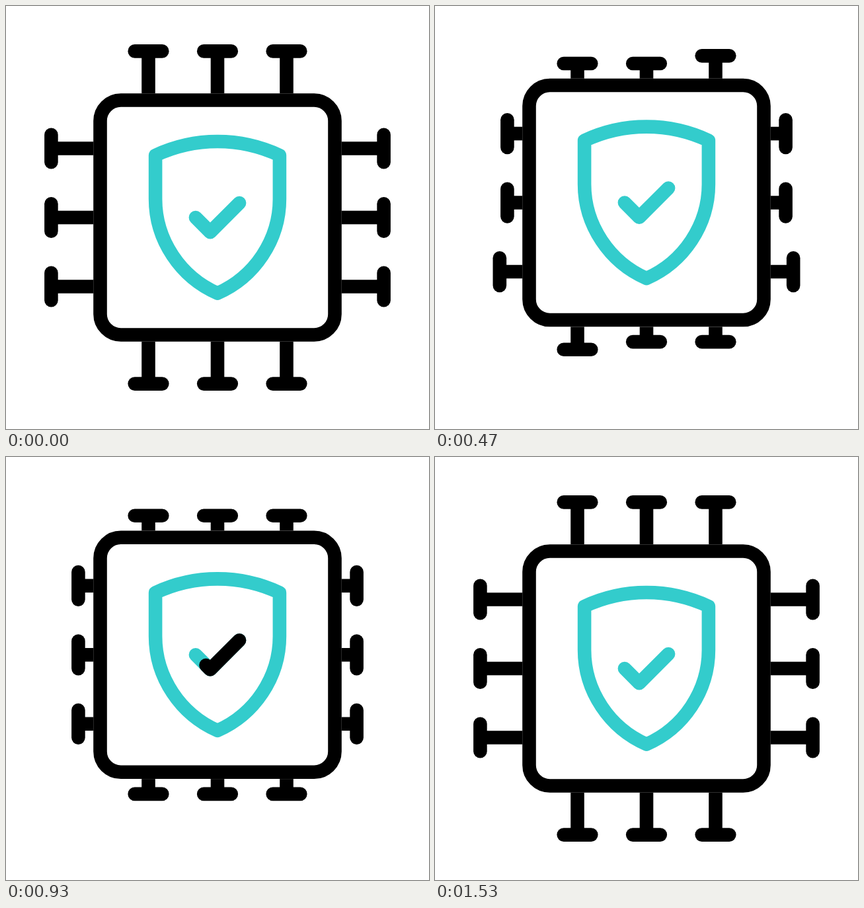
An HTML page with a canvas for the animation above (1.67 s loop, 640 px wide and 640 px high).

```html
<!DOCTYPE html>
<html lang="en">
<head>
<meta charset="utf-8">
<title>Secure chip</title>
<style>
  html, body { margin: 0; width: 100%; height: 100%; overflow: hidden; background: #fff; }
  canvas { display: block; width: 640px; height: 640px; }
</style>
</head>
<body>
<canvas id="stage" width="640" height="640"></canvas>
<script>
const ctx = document.getElementById('stage').getContext('2d');
const LOOP = 1670, FRAME = 100 / 3;
const STROKE = 20.6, TEAL = '#33cccc', BLACK = '#000';
const EDGE = 187.8;      // chip centre to its outer edge
const PIN_REACH = 251.6; // chip centre to a pin head
const PIN_TRAVEL = 41;
const PIN_GAP = 104.5;

// Vertical bounce: [frame, offset]
const BOUNCE = [[0, 0], [11.6, -37.3], [19.9, 36], [28, -20.7], [36, 7], [42.8, 0]];

const shield = new Path2D(
  'M226.1 226 A221 221 0 0 1 413.9 226 V292 C413.9 354 376 410 320 434.6 C264 410 226.1 354 226.1 292 Z');
const check = new Path2D('M286.9 320 L309 342.1 L353.1 298');
const CHECK_LENGTH = 66.2 * Math.SQRT2;

const progress = (f, from, to) => Math.min(1, Math.max(0, (f - from) / (to - from)));
const smooth = t => t * t * (3 - 2 * t);

// cubic-bezier(.25, 0, .75, 1)
function softEase(t) {
  let lo = 0, hi = 1;
  for (let i = 0; i < 20; i++) {
    const u = (lo + hi) / 2, v = 1 - u;
    if (0.75 * u * v * v + 2.25 * u * u * v + u * u * u < t) lo = u; else hi = u;
  }
  return smooth(lo);
}

function bounce(f) {
  for (let i = 1; i < BOUNCE.length; i++) {
    const [start, a] = BOUNCE[i - 1], [end, b] = BOUNCE[i];
    if (f < end) {
      const t = progress(f, start, end);
      return a + (b - a) * smooth(i === 1 ? t ** 0.9 : t);
    }
  }
  return 0;
}

function retraction(f, i) {
  const pull = 4 + 3 * i, push = 36 + 2 * i;
  return softEase(progress(f, pull, pull + 6)) - softEase(progress(f, push, push + 6));
}

function line(x1, y1, x2, y2, cap) {
  ctx.lineCap = cap;
  ctx.beginPath();
  ctx.moveTo(x1, y1);
  ctx.lineTo(x2, y2);
  ctx.stroke();
}

function drawPins(f, angle, flip) {
  ctx.save();
  ctx.translate(320, 320);
  ctx.rotate(angle);
  ctx.scale(flip, 1);
  for (let i = 0; i < 3; i++) {
    const x = (i - 1) * PIN_GAP;
    const y = PIN_TRAVEL * retraction(f, i) - PIN_REACH;
    line(x, y, x, -EDGE, 'butt');
    line(x - 20.8, y, x + 20.8, y, 'round');
  }
  ctx.restore();
}

function drawCheckSweep(f) {
  const head = CHECK_LENGTH * smooth(progress(f, 18, 28));
  const tail = CHECK_LENGTH * smooth(progress(f, 25, 34.5));
  if (head - tail < 0.01) return;
  ctx.strokeStyle = BLACK;
  ctx.setLineDash([head - tail, 200]);
  ctx.lineDashOffset = -tail;
  ctx.stroke(check);
  ctx.setLineDash([]);
}

function draw(f) {
  ctx.fillStyle = '#fff';
  ctx.fillRect(0, 0, 640, 640);
  ctx.save();
  ctx.translate(0, bounce(f));
  ctx.lineWidth = STROKE;
  ctx.lineJoin = 'round';

  ctx.strokeStyle = BLACK;
  drawPins(f, 0, 1);
  drawPins(f, Math.PI / 2, 1);
  drawPins(f, Math.PI, 1);
  drawPins(f, -Math.PI / 2, -1);

  ctx.beginPath();
  ctx.roundRect(142.5, 142.5, 355, 355, 31.3);
  ctx.stroke();

  ctx.lineCap = 'round';
  ctx.strokeStyle = TEAL;
  ctx.stroke(shield);
  ctx.stroke(check);
  drawCheckSweep(f);
  ctx.restore();
}

const origin = performance.now();
function tick() {
  const ms = (performance.now() - origin) % LOOP;
  draw(Math.floor((ms + 4) / FRAME));
  requestAnimationFrame(tick);
}
tick();
</script>
</body>
</html>
```
